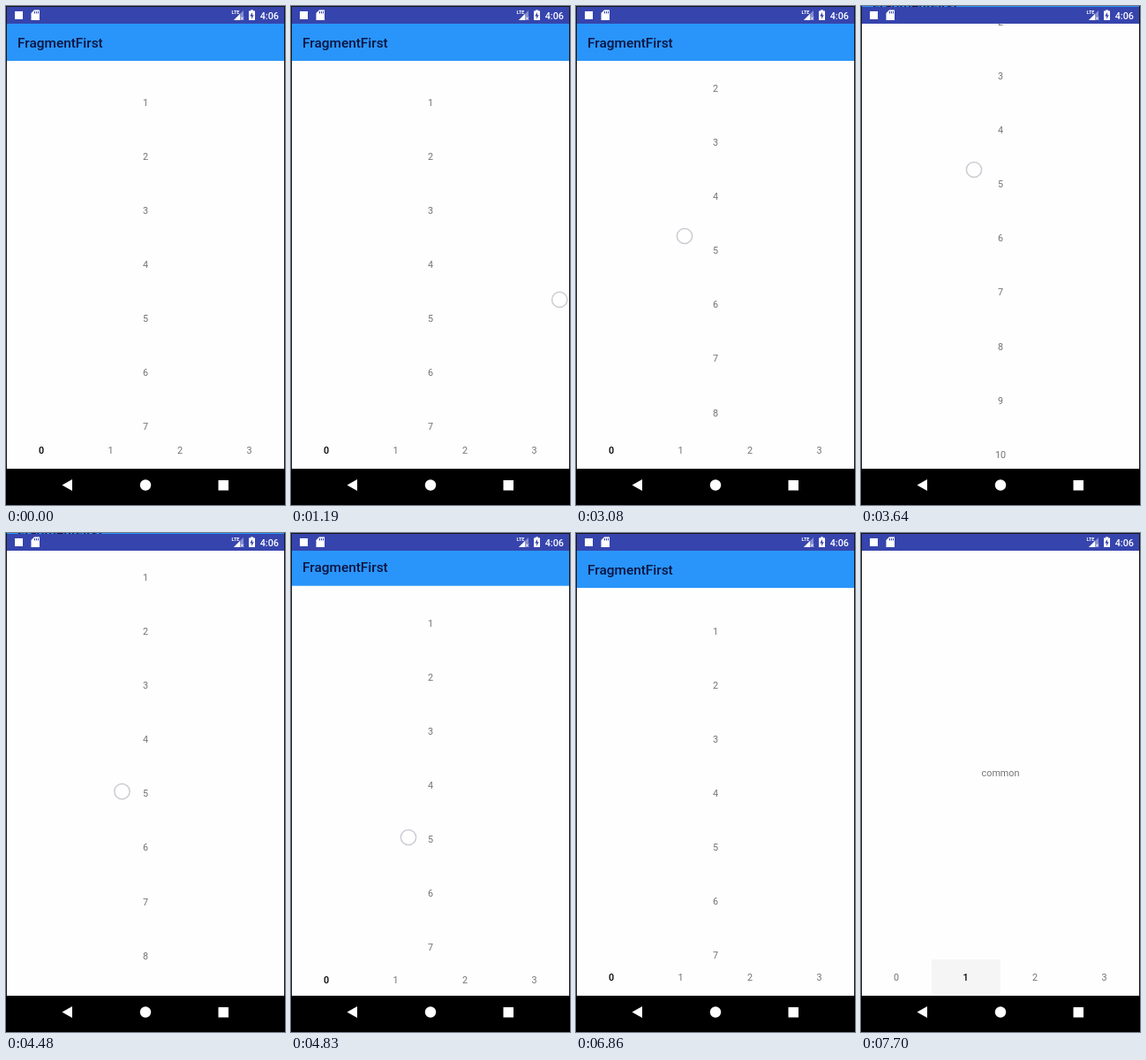
Animation, 316 px wide and 564 px high, one loop 8000 ms. Source, as an HTML page with a canvas:

```html
<!DOCTYPE html>
<html lang="en">
<head>
<meta charset="utf-8">
<title>Scrolling list with hiding bars</title>
<style>
  html, body { margin: 0; width: 100%; height: 100%; overflow: hidden; background: #000; }
  canvas { display: block; width: 316px; height: 564px; }
</style>
</head>
<body>
<canvas id="stage"></canvas>
<script>
const W = 316, H = 564, LOOP = 8000, STEP = 70;
const STATUS_BOTTOM = 20, BAR_BOTTOM = 62, TABS_TOP = 481, NAV_TOP = 523;
const SWITCH = 7350;
const TAB_X = [40, 118.5, 197, 275.5];

// Pointer path: time, x, y
const PATH = [
  [1050, 326, 330], [2380, 119, 348], [2450, 119, 348], [3080, 123, 260],
  [3640, 128, 185], [3710, 128, 178], [4830, 133, 344], [4970, 134, 353],
  [5180, 134, 353], [6160, 326, 400], [7070, 326, 470], [7280, 118, 502],
  [7490, -14, 490]
];

const canvas = document.getElementById('stage');
const ctx = canvas.getContext('2d');
const dpr = window.devicePixelRatio || 1;
canvas.width = W * dpr;
canvas.height = H * dpr;

const clamp = (v, lo, hi) => Math.min(hi, Math.max(lo, v));
const progress = (t, start, end) => clamp((t - start) / (end - start), 0, 1);
const easeOut = u => 1 - (1 - u) * (1 - u);
const easeInOut = u => u * u * (3 - 2 * u);

function rect(x, y, w, h, color) {
  ctx.fillStyle = color;
  ctx.fillRect(x, y, w, h);
}

function polygon(color, ...points) {
  ctx.fillStyle = color;
  ctx.beginPath();
  points.forEach(([x, y]) => ctx.lineTo(x, y));
  ctx.fill();
}

function circle(x, y, r) {
  ctx.beginPath();
  ctx.arc(x, y, r, 0, Math.PI * 2);
}

function text(str, x, midY, color, { size = 10.8, weight = 400, align = 'center' } = {}) {
  ctx.font = `${weight} ${size}px Roboto, sans-serif`;
  ctx.textAlign = align;
  ctx.fillStyle = color;
  ctx.fillText(str, x, midY + size * 0.356);
}

function pointerAt(t) {
  if (t <= PATH[0][0]) return { x: PATH[0][1], y: PATH[0][2] };
  for (let i = 1; i < PATH.length; i++) {
    const [t0, x0, y0] = PATH[i - 1], [t1, x1, y1] = PATH[i];
    if (t <= t1) {
      const u = progress(t, t0, t1);
      return { x: x0 + (x1 - x0) * u, y: y0 + (y1 - y0) * u };
    }
  }
  return { x: -14, y: 490 };
}

// The list follows the finger once it has moved past the touch slop.
function scrollAt(t, y) {
  if (t < 2450) return 2;
  if (t <= 3710) return Math.max(2, 339 - y);
  if (t < 4970) return clamp(353 - y, 0, 161);
  return 0;
}

function hiddenAt(t) {
  return easeInOut(progress(t, 3150, 3400)) - easeOut(progress(t, 4600, 4900));
}

function drawList(scroll) {
  for (let i = 0; i < 11; i++) {
    const y = 111 + 61.1 * i - scroll;
    if (y > 5 && y < NAV_TOP + 10) text(i + 1, 158, y, '#737373');
  }
}

function drawTitleBar(shift) {
  rect(1, STATUS_BOTTOM - shift, W - 2, BAR_BOTTOM - STATUS_BOTTOM, '#2995fa');
  text('FragmentFirst', 13, 41.2 - shift, '#0b1440', { size: 15.4, weight: 500, align: 'left' });
}

function drawRipple(t, top) {
  if (t < 7280) return;
  ctx.save();
  ctx.beginPath();
  ctx.rect(80, top + 1, 78, 39);
  ctx.clip();
  ctx.fillStyle = t < 7700 ? '#ebebeb' : '#f5f5f5';
  circle(118.5, top + 21, 8 + 42 * easeOut(progress(t, 7210, 7490)));
  ctx.fill();
  ctx.restore();
}

function drawTabs(t, shift) {
  const top = TABS_TOP + shift, active = t < SWITCH ? 0 : 1;
  rect(1, top, W - 2, 42, '#fefefe');
  drawRipple(t, top);
  TAB_X.forEach((x, i) => {
    const on = i === active;
    text(i, x, top + 21.5, on ? '#000' : '#737373', { weight: on ? 500 : 400 });
  });
}

function drawStatus() {
  const blue = '#3644ad';
  rect(1, 1, W - 2, STATUS_BOTTOM - 1, blue);
  rect(10, 6, 9, 9, '#fff');
  polygon('#fff', [32, 4.5], [38, 4.5], [38, 16], [28.5, 16], [28.5, 8]);
  [32, 34, 36].forEach(x => rect(x, 6, 1, 2.5, blue));

  text('LTE', 255.5, 7.3, '#fff', { size: 5.5, weight: 700, align: 'left' });
  polygon('rgba(255,255,255,.4)', [269, 5], [269, 16], [258, 16]);
  polygon('#fff', [265, 9], [265, 16], [258, 16]);
  ctx.strokeStyle = '#fff';
  ctx.lineWidth = 0.9;
  ctx.beginPath();
  ctx.moveTo(266, 12.5); ctx.lineTo(269, 15.5);
  ctx.moveTo(269, 12.5); ctx.lineTo(266, 15.5);
  ctx.stroke();

  rect(277, 4.5, 3, 2, '#fff');
  rect(275, 5.5, 7, 10.5, '#fff');
  polygon(blue, [279, 7], [276.3, 11.5], [278.2, 11.5], [278, 14.8], [280.8, 10.3], [279, 10.3]);
  text('4:06', 309, 10.8, '#fff', { weight: 500, align: 'right' });
}

function drawNav() {
  rect(0, NAV_TOP, W, H - NAV_TOP, '#000');
  polygon('#fff', [63.5, 541.5], [75, 535], [75, 548]);
  ctx.fillStyle = '#fff';
  circle(158, 541.5, 6.2);
  ctx.fill();
  rect(240.5, 536, 11.5, 11.5, '#fff');
}

function drawPointer({ x, y }) {
  circle(x, y, 8.6);
  ctx.fillStyle = 'rgba(255,255,255,.6)';
  ctx.fill();
  ctx.strokeStyle = '#cbcbd3';
  ctx.lineWidth = 1.5;
  ctx.stroke();
}

function draw(t) {
  const pointer = pointerAt(t);
  ctx.setTransform(dpr, 0, 0, dpr, 0, 0);
  rect(0, 0, W, H, '#161616');
  rect(1, STATUS_BOTTOM, W - 2, NAV_TOP - STATUS_BOTTOM, '#fefefe');
  if (t < SWITCH) {
    const shift = 42 * hiddenAt(t);
    drawList(scrollAt(t, pointer.y));
    drawTitleBar(shift);
    drawTabs(t, shift);
  } else {
    text('common', 158, 271.5, '#737373');
    drawTabs(t, 0);
  }
  drawStatus();
  drawNav();
  drawPointer(pointer);
}

const start = performance.now();
function tick() {
  const t = (performance.now() - start) % LOOP;
  draw(Math.floor(t / STEP) * STEP);
  requestAnimationFrame(tick);
}
tick();
</script>
</body>
</html>
```
